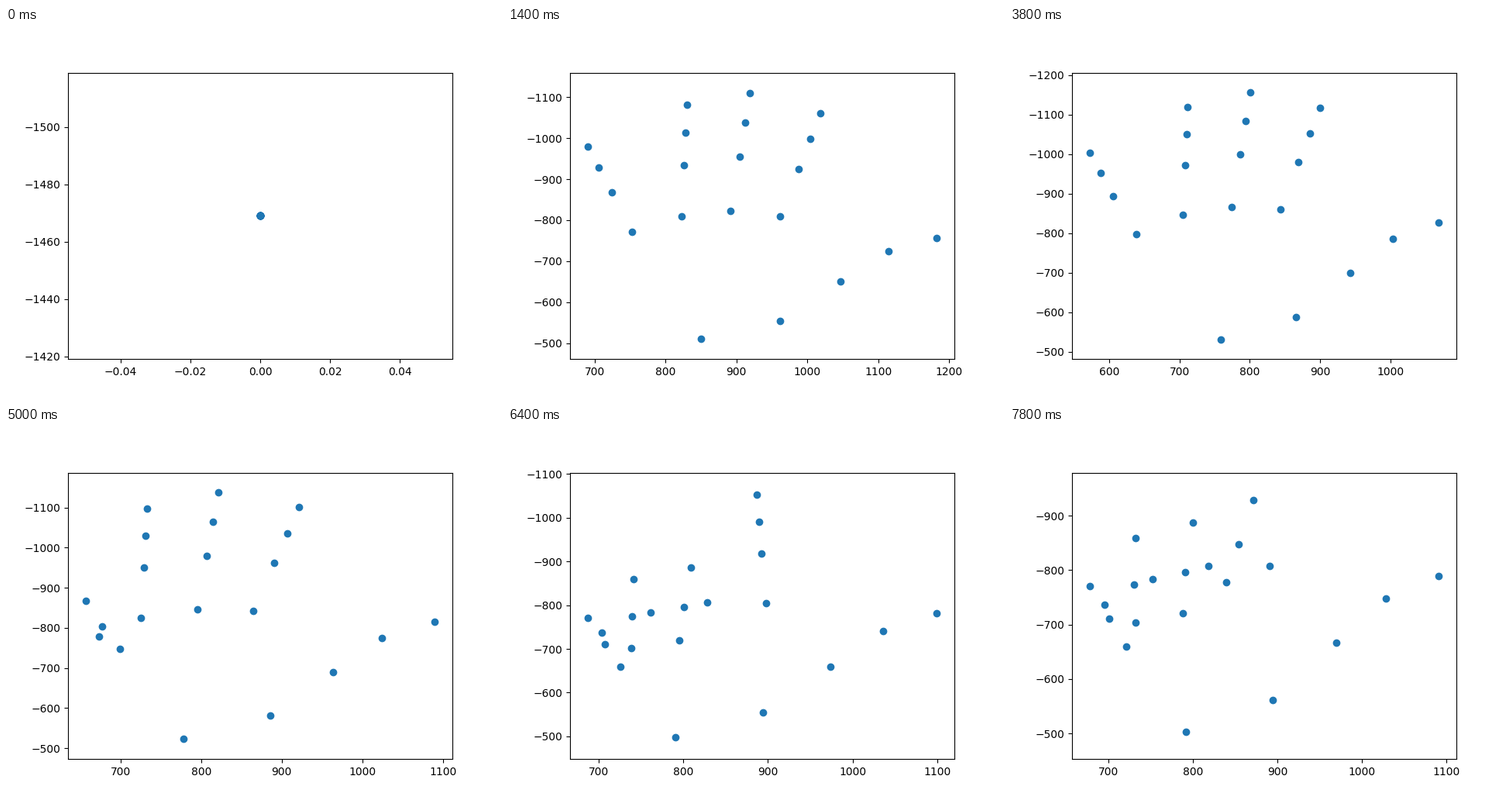
These frames come from a looping animation (640 px wide and 480 px high, 8000 ms). A matplotlib script:

```python
import numpy as np
import matplotlib.pyplot as plt
from matplotlib.animation import FuncAnimation

FRAMES = 40
STEP_MS = 200
START = 2               # first frame with a hand
PAD = 50                # vertical room around the points
FOLD_FRAMES = 6         # time a finger takes to fold

WRIST = np.array([850, 511])
THUMB = np.array([(0, 0), (111, 43), (197, 139), (264, 213), (332.5, 245)])
SHARE = np.array([0.46, 0.29, 0.25])    # bone lengths along a finger

# place from the middle finger, tip seen from knuckle,
# fold start, knuckle settled, knuckle bend
FINGERS = [
    (-1, (57, 251), 32, 39, 0),
    (0, (26.5, 287), 25, 32, 0.95),
    (1, (7.5, 272), 25, 32, 0.95),
    (2, (-63, 209), 19, 32, 1.2),
]

# frame, wrist shift, palm shift
DRIFT = np.array([
    (START, 4, -28, 4, -28),
    (7, 0, 0, 0, 0),
    (12, -46, 30, -60, 33.5),
    (19, -91, 20, -118, 39),
    (25, -72, 12, -97, 18.5),
    (32, -59, -13, -64, -23),
    (39, -58, -8, -74, -22),
])


def ease(frame, start, end):
    t = np.clip((frame - start) / (end - start), 0, 1)
    return t * t * (3 - 2 * t)


def finger(frame, lean, k, tip, start, settle, bend):
    """Knuckle and three joints; folding turns the outer bones back."""
    fold = ease(frame, start, start + FOLD_FRAMES)
    lift = np.cos(bend * ease(frame, start, settle))
    drop = np.cos(np.pi * fold)
    reach = SHARE * (lift, drop, drop) * (1 + 0.08 * fold)
    bones = np.outer(reach, tip)
    bones[0, 0] *= 1 - fold / 2
    bones[:, 0] -= lean * np.maximum(bones[:, 1], 0)
    knuckle = (892 - 69.5 * k + 3.5 * k * k * fold, 823 - 13 * k * k)
    return np.cumsum(np.vstack([knuckle, bones]), axis=0)


def drift(frame):
    times = DRIFT[:, 0]
    k = min(np.searchsorted(times, frame, side="right"), len(times) - 1)
    a, b = DRIFT[k - 1], DRIFT[k]
    shift = a + (b - a) * ease(frame, a[0], b[0])
    return shift[1:3], shift[3:5]


def joints(frame):
    if frame < START:
        return np.tile((0.0, 1469.0), (21, 1))
    grip = ease(frame, 25, 25 + FOLD_FRAMES)
    thumb = WRIST + THUMB * (1 - 0.06 * grip, 1)
    fingers = [finger(frame, 0.27 * grip, *f) for f in FINGERS]
    hand = np.vstack([thumb, *fingers])

    # the palm drifts fully, points nearer the wrist follow the wrist
    wrist, palm = drift(frame)
    side, up = (hand - WRIST).T
    weight = np.clip(up / 300, 0, 1)[:, None]
    hand += wrist + weight * (palm - wrist)
    hand[:, 1] += 0.03 * np.sqrt(max(frame - 7, 0)) * side
    return hand


fig, ax = plt.subplots(figsize=(6.4, 4.8), dpi=100)


def draw(frame):
    x, height = joints(frame).T
    y = -height
    ax.clear()
    ax.scatter(x, y)
    ax.set_ylim(y.max() + PAD, y.min() - PAD)


anim = FuncAnimation(fig, draw, frames=FRAMES, interval=STEP_MS,
                     repeat=True, repeat_delay=0)
plt.show()
```
